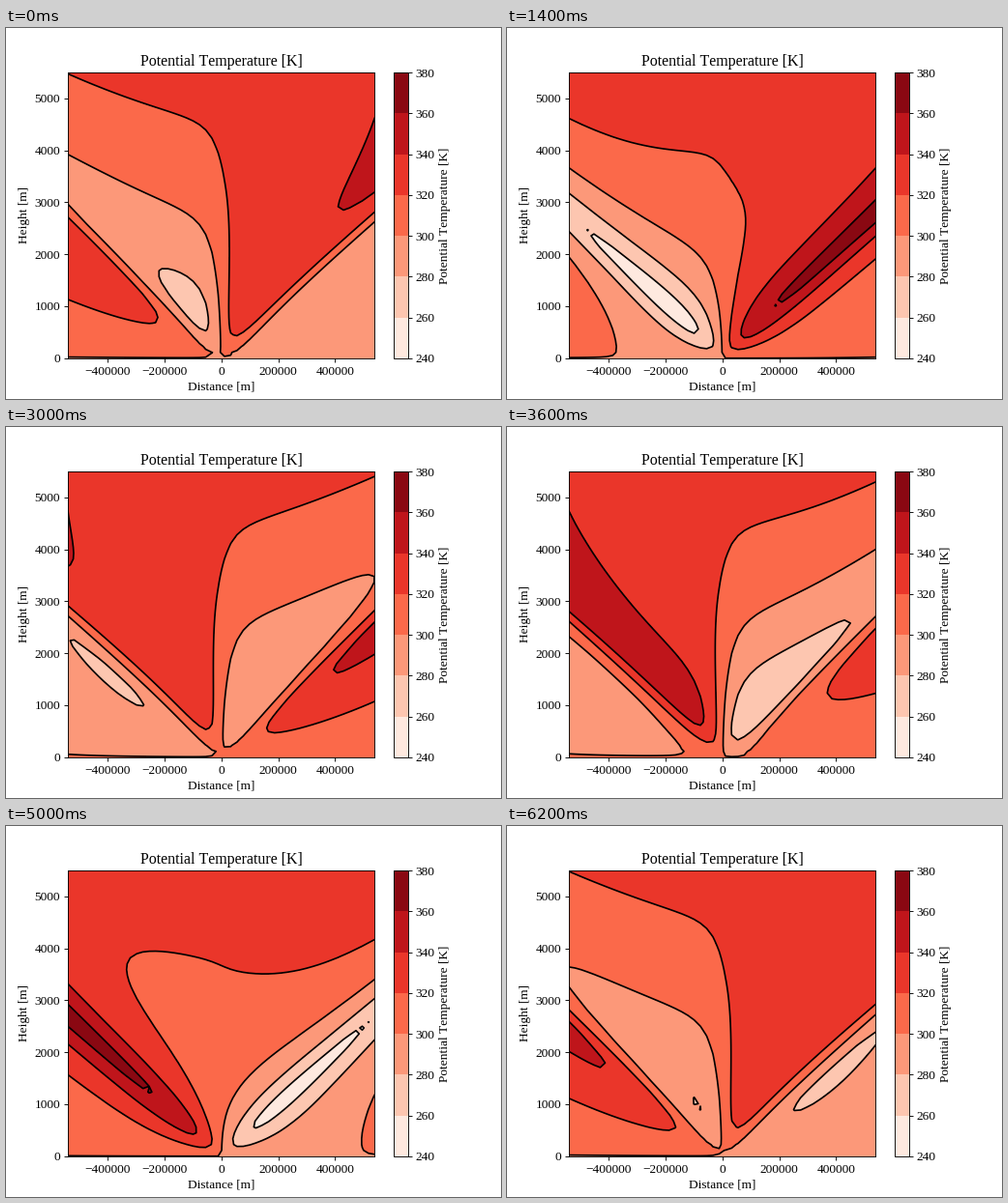
Write a matplotlib script that moves like this. It is 512 px wide and 384 px high and loops after 6400 ms.

```python
import numpy as np
import matplotlib.pyplot as plt
from matplotlib.animation import FuncAnimation
from matplotlib.cm import ScalarMappable
from matplotlib.colors import BoundaryNorm, ListedColormap

plt.rcParams.update({"font.family": "Liberation Serif", "font.size": 12,
                     "text.kerning_factor": 6})

FRAMES, INTERVAL = 32, 200
HALF_WIDTH, TOP = 540e3, 5500
DEPTH = 1530            # e-folding height of the forcing [m]
RAY_SLOPE = 0.00503     # slope of the wave beams
COAST = 0.17            # scaled width of the coastline
AMPLITUDE = 36          # [K]
LAPSE = 0.00547         # background gradient [K/m]
PEAK_FRAME = 24.65
LEVELS = np.arange(240, 381, 20)


def beam_table():
    """Integral of k exp(-k (COAST - i s)) / (1 + k^2) over k, for s >= 0."""
    dk = 0.02
    k = np.arange(dk / 2, 60, dk)
    s = np.linspace(0, 6, 601)
    weight = k / (1 + k**2) * np.exp(-COAST * k) * dk
    return s, np.exp(1j * np.outer(s, k)) @ weight


S, BEAM = beam_table()


def even(s):
    return np.interp(np.abs(s), S, BEAM.real)


def odd(s):
    return np.sign(s) * np.interp(np.abs(s), S, BEAM.imag)


x = np.linspace(-HALF_WIDTH, HALF_WIDTH, 50)
z = np.linspace(0, TOP, 50)
X, Z = np.meshgrid(x * RAY_SLOPE / DEPTH, z / DEPTH)
background = 300 + LAPSE * z[:, None]
in_phase = even(Z - X) - even(Z + X)
quadrature = odd(Z - X) - odd(Z + X) + 2 * odd(X) * np.exp(-Z)


def theta(frame):
    """Background plus a wave that is antisymmetric about the coast."""
    step = 2 * np.pi / FRAMES
    phase = (frame - PEAK_FRAME) * step
    wave = in_phase * np.cos(phase) - quadrature * np.sin(phase)
    # in_phase is positive for x > 0, where the beam is cold at PEAK_FRAME
    return background - AMPLITUDE * wave - 0.4 * np.cos(frame * step)


fig, ax = plt.subplots(figsize=(6.4, 4.8), dpi=80)
shades = plt.get_cmap("Reds")((LEVELS[:-1] + 10 - 240) / 140)
scale = ScalarMappable(BoundaryNorm(LEVELS, len(shades)), ListedColormap(shades))
bar = fig.colorbar(scale, ax=ax, ticks=LEVELS)
bar.set_label("Potential Temperature [K]")

ax.set(xlim=(-HALF_WIDTH, HALF_WIDTH), ylim=(0, TOP),
       xticks=np.arange(-400000, 400001, 200000), yticks=np.arange(0, 5001, 1000),
       xlabel="Distance [m]", ylabel="Height [m]", title="Potential Temperature [K]")

drawn = []


def update(frame):
    while drawn:
        drawn.pop().remove()
    field = theta(frame)
    drawn.append(ax.contourf(x, z, field, LEVELS, colors=shades))
    drawn.append(ax.contour(x, z, field, LEVELS, colors="black", linewidths=1.5))
    return drawn


anim = FuncAnimation(fig, update, frames=FRAMES, interval=INTERVAL,
                     init_func=lambda: update(0), repeat=True)
plt.show()
```
